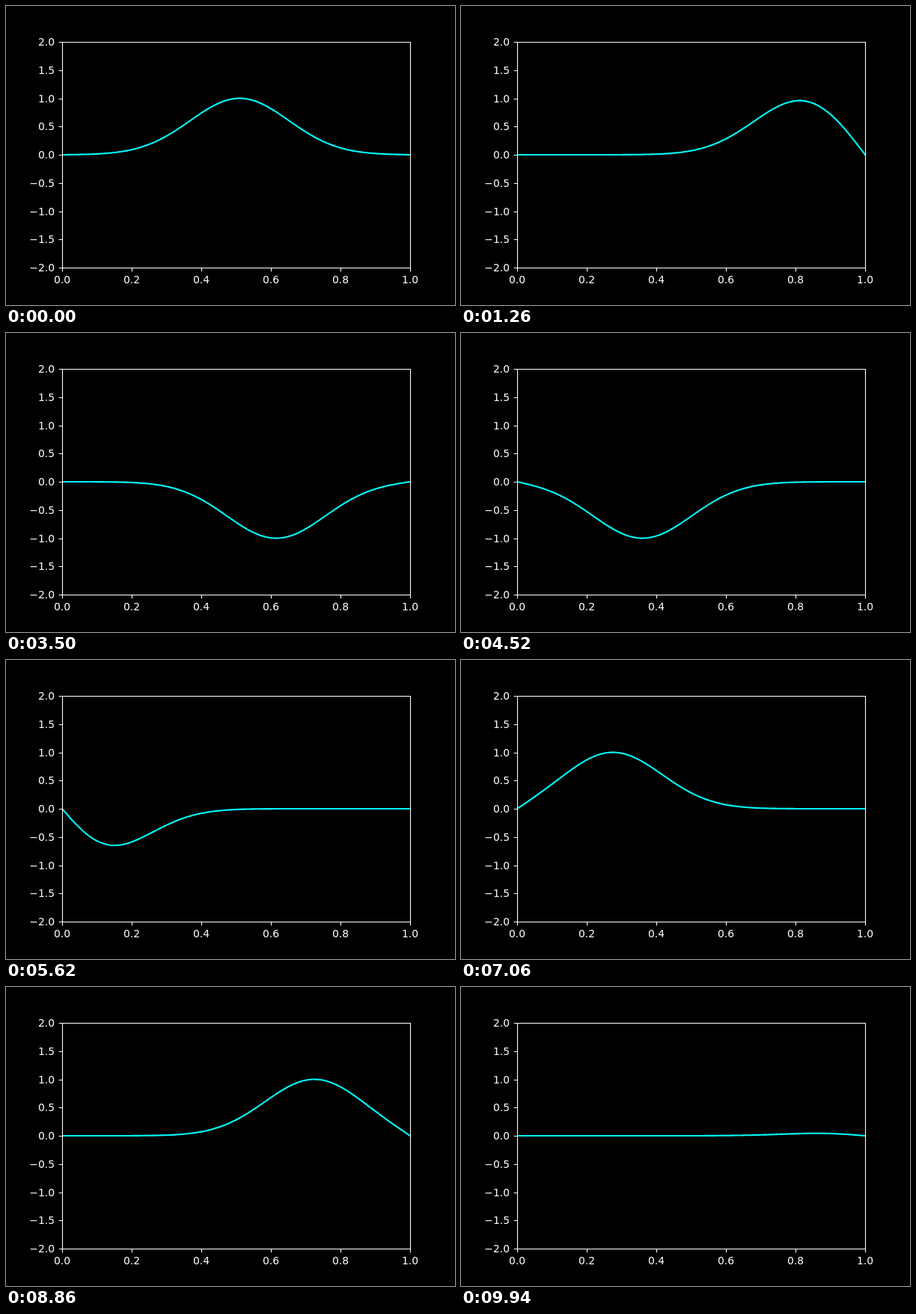
An HTML page with a canvas for the animation above (9.96 s loop, 600x400 px).

```html
<!DOCTYPE html>
<html lang="en">
<head>
<meta charset="utf-8">
<title>Reflecting wave pulse</title>
<style>
  html, body { margin: 0; width: 100%; height: 100%; overflow: hidden; background: #000; }
  canvas { display: block; }
</style>
</head>
<body>
<canvas id="plot" width="600" height="400"></canvas>
<script>
const ctx = document.getElementById('plot').getContext('2d');
const LEFT = 75, RIGHT = 540, TOP = 48, BOTTOM = 350;
const STEP = 20, LOOP = 9960;
const START = 0.51, SPEED = 0.005, WIDTH = 0.2;

const px = x => LEFT + x * (RIGHT - LEFT);
const py = y => (TOP + BOTTOM) / 2 - y * (BOTTOM - TOP) / 4;
const snap = v => Math.round(v) + 0.5;
const pulse = d => Math.exp(-((d / WIDTH) ** 2));

// Travelling pulse between fixed ends, by the method of images
function wave(x, shift) {
  let u = 0;
  for (let k = -4; k <= 4; k += 2) u += pulse(x - shift - k) - pulse(x + shift - k);
  return u;
}

function drawCurve(shift) {
  ctx.save();
  ctx.beginPath();
  ctx.rect(LEFT, TOP, RIGHT - LEFT, BOTTOM - TOP);
  ctx.clip();
  ctx.beginPath();
  for (let i = 0; i <= 200; i++) ctx.lineTo(px(i / 200), py(wave(i / 200, shift)));
  ctx.strokeStyle = '#0ff';
  ctx.lineWidth = 2.08;
  ctx.lineCap = 'square';
  ctx.lineJoin = 'round';
  ctx.stroke();
  ctx.restore();
}

function drawAxes() {
  ctx.strokeStyle = ctx.fillStyle = '#fff';
  ctx.lineWidth = 1.11;
  ctx.font = '13.89px "DejaVu Sans", sans-serif';
  ctx.beginPath();
  ctx.rect(LEFT + 0.5, TOP + 0.5, RIGHT - LEFT, BOTTOM - TOP);

  ctx.textAlign = 'center';
  for (let i = 0; i <= 5; i++) {
    const x = snap(px(i / 5));
    ctx.moveTo(x, BOTTOM + 0.5);
    ctx.lineTo(x, BOTTOM + 5.36);
    ctx.fillText((i / 5).toFixed(1), x - 0.5, 371);
  }

  ctx.textAlign = 'right';
  for (let i = -4; i <= 4; i++) {
    const y = snap(py(i / 2));
    ctx.moveTo(LEFT + 0.5, y);
    ctx.lineTo(LEFT - 4.36, y);
    ctx.fillText((i / 2).toFixed(1).replace('-', '\u2212'), 65, y + 4.5);
  }
  ctx.stroke();
}

function draw() {
  const step = Math.floor((performance.now() - begin) % LOOP / STEP);
  ctx.fillStyle = '#000';
  ctx.fillRect(0, 0, 600, 400);
  drawCurve(START + SPEED * step);
  drawAxes();
  requestAnimationFrame(draw);
}

const begin = performance.now();
draw();
</script>
</body>
</html>
```
